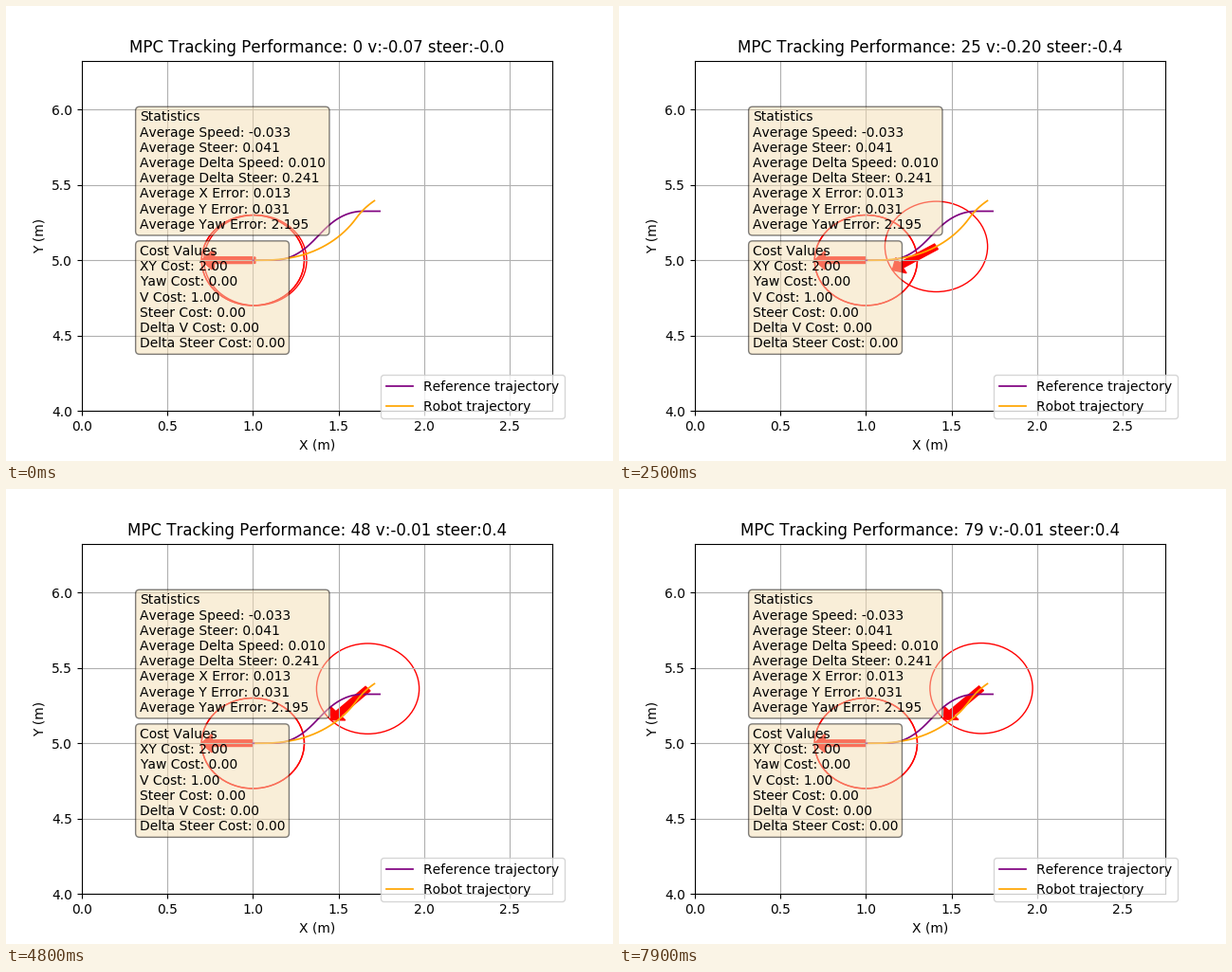
Write a matplotlib script that moves like this. It is 640 px wide and 480 px high and loops after 8000 ms.

```python
import numpy as np
import matplotlib.pyplot as plt
from matplotlib.animation import FuncAnimation
from matplotlib.patches import Circle, Polygon

plt.rcParams["text.kerning_factor"] = 6
plt.rcParams["lines.linewidth"] = 1.25

FRAMES, DT = 80, 0.2
START = np.array([1.0, 5.0])
TURN, PEAK, END = 0.053, 0.70, 0.857  # arc lengths where steering changes


def trace(s, yaw):
    """Integrate a heading profile over arc length, starting at START."""
    mid = (yaw[1:] + yaw[:-1]) / 2
    step = np.diff(s)[:, None] * np.column_stack([np.cos(mid), np.sin(mid)])
    return START + np.vstack([[0, 0], np.cumsum(step, axis=0)])


def robot_yaw(s):
    """Ease into a left turn, then turn right from PEAK on."""
    return np.interp(s, [TURN, 0.223, PEAK, END], [0, 0.2, 1.005, 0.65])


s = np.linspace(0, END, 400)
ref = trace(s, 0.87 * np.sin(np.pi * np.clip((s - 0.12) / 0.64, 0, 1)))
path = trace(s, robot_yaw(s))

# Creep, speed up, then brake exponentially near the goal
n = np.arange(FRAMES)
speed = np.interp(n, [0, 9, 18, 25.5], [0.07, 0.047, 0.07, 0.21])
speed *= np.exp(-np.maximum(n - 30, 0) / 4.6)
dist = np.cumsum(speed * DT)

shown_speed = -np.maximum(speed, 0.01)
shown_steer = np.where(dist < TURN, -0.0, np.where(dist < PEAK, -0.4, 0.4))


def arrow_points(pos, yaw, length=0.3, width=0.2):
    """Outline of an arrow that points backwards along the heading."""
    half = np.array([[0, 0.1], [0.8, 0.1], [0.8, 0.3], [1, 0]])
    outline = np.vstack([half, half[-2::-1] * [1, -1]]) * [length, width]
    c, k = -np.cos(yaw), -np.sin(yaw)
    return outline @ np.array([[c, k], [-k, c]]) + pos


def add_robot():
    ring = ax.add_patch(Circle(START, 0.3, fill=False, color="red"))
    arrow = ax.add_patch(Polygon(arrow_points(START, 0), color="red"))
    return ring, arrow


def add_box(y, text):
    fig.text(0.22, y, text, fontsize=10, va="top",
             bbox=dict(boxstyle="round", facecolor="wheat", alpha=0.5))


fig, ax = plt.subplots(figsize=(6.4, 4.8), dpi=100)
ax.set(xlim=(0, 2.75), ylim=(4, 6.325), xlabel="X (m)", ylabel="Y (m)")
ax.grid(True)
title = ax.set_title("")

driven = path[s >= dist[0]]
ax.plot(*ref.T, color="purple", label="Reference trajectory")
ax.plot(*driven.T, color="orange", label="Robot trajectory")
ax.legend(loc="lower right", borderaxespad=0,
          bbox_to_anchor=(588.5 / 640, 1 - 435.2 / 480),
          bbox_transform=fig.transFigure)

add_box(0.77, """Statistics
Average Speed: -0.033
Average Steer: 0.041
Average Delta Speed: 0.010
Average Delta Steer: 0.241
Average X Error: 0.013
Average Y Error: 0.031
Average Yaw Error: 2.195""")
add_box(0.475, """Cost Values
XY Cost: 2.00
Yaw Cost: 0.00
V Cost: 1.00
Steer Cost: 0.00
Delta V Cost: 0.00
Delta Steer Cost: 0.00""")

# The parked pose is drawn twice, which gives it a firmer outline
for _ in range(2):
    add_robot()
ring, arrow = add_robot()


def update(i):
    pos = [np.interp(dist[i], s, axis) for axis in path.T]
    ring.center = pos
    arrow.set_xy(arrow_points(pos, robot_yaw(dist[i])))
    title.set_text(f"MPC Tracking Performance: {i} "
                   f"v:{shown_speed[i]:.2f} steer:{shown_steer[i]:.1f}")
    return ring, arrow, title


anim = FuncAnimation(fig, update, frames=FRAMES, interval=100, repeat=True)
plt.show()
```
